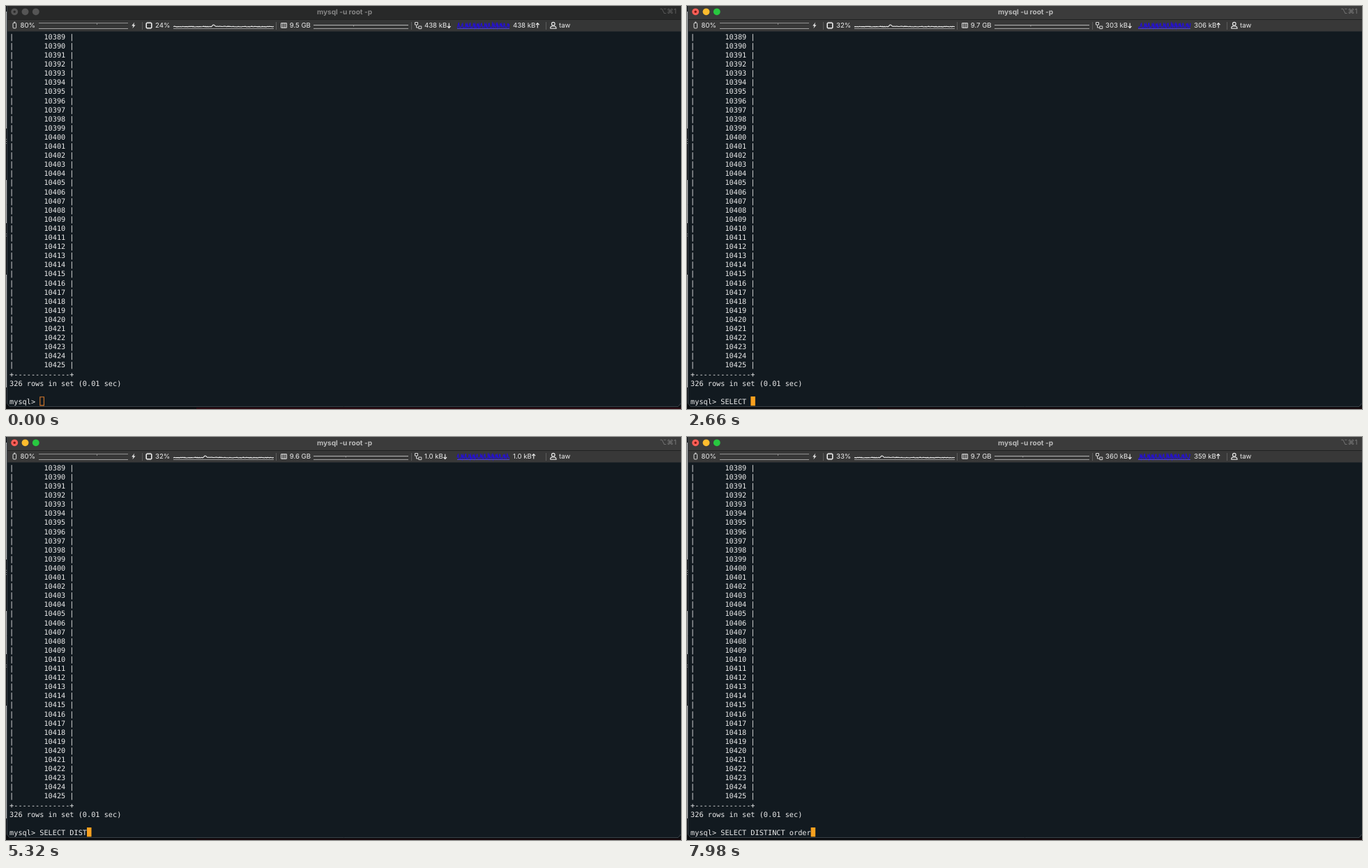
Animation of 968 by 579 pixels, one loop 8 s. Source, as an HTML page with a canvas:

```html
<!DOCTYPE html>
<html lang="en">
<head>
<meta charset="utf-8">
<title>Terminal session</title>
<style>
html, body { margin: 0; width: 100%; height: 100%; overflow: hidden; background: #0b0d10; }
canvas { display: block; }
</style>
</head>
<body>
<canvas id="stage" width="968" height="579"></canvas>
<script>
const ctx = document.getElementById('stage').getContext('2d');
ctx.textRendering = 'geometricPrecision';

const LOOP = 8000, FOCUS_AT = 490, SAMPLE_MS = 650;
const CELL = 6.162, ROW = 13.1, LEFT = 5.1, BASE = 47.8;
const MONO = '10.24px "DejaVu Sans Mono", monospace';
const UI = '9.6px Inter, sans-serif';
const WHITE = '#ececec';

// Each edit: time, characters to erase, text to add.
const EDITS = [
  [1050, 0, 'S'], [1190, 0, 'E'], [1330, 0, 'L'], [1470, 0, 'E'], [1610, 0, 'C'],
  [1890, 0, 'T'], [2240, 0, ' '], [2870, 0, 'D'], [3150, 0, 'I'], [3430, 0, 'S'],
  [3780, 1, ''], [3920, 1, ''], [4060, 1, ''], [4340, 0, 'D'], [4620, 0, 'S'],
  [4830, 1, ''], [4900, 0, 'I'], [5040, 0, 'S'], [5250, 0, 'T'], [5390, 0, 'I'],
  [5530, 0, 'N'], [5670, 0, 'C'], [5810, 0, 'T'], [5950, 0, ' '], [6930, 0, 'o'],
  [7420, 0, 'r'], [7630, 0, 'd'], [7770, 0, 'e'], [7910, 0, 'r']
];
const CPU = [24, 26, 28, 30, 32, 30, 31, 31, 32, 34, 33, 33, 33];
const RAM = ['9.5', '9.6', '9.6', '9.6', '9.7', '9.7', '9.7', '9.6', '9.6', '9.6', '9.7', '9.7', '9.7'];
const NET = [
  [0, '438', '438'], [650, '1.0', '1.0'], [1950, '303', '306'], [3250, '307', '333'],
  [3900, '298', '297'], [4900, '1.0', '1.0'], [6500, '86', '88'], [7150, '360', '359']
];

const noise = n => {
  const s = Math.sin(n * 127.1 + 31.7) * 43758.5453;
  return s - Math.floor(s);
};

function rect(x, y, w, h, color) {
  ctx.fillStyle = color;
  ctx.fillRect(x, y, w, h);
}

function path(points, color, width = 1) {
  ctx.strokeStyle = color;
  ctx.lineWidth = width;
  ctx.beginPath();
  points.forEach(([x, y]) => ctx.lineTo(x, y));
  ctx.stroke();
}

function box(x, y, w, h, color, width = 1, radius = 0) {
  ctx.strokeStyle = color;
  ctx.lineWidth = width;
  ctx.beginPath();
  ctx.roundRect(x, y, w, h, radius);
  ctx.stroke();
}

function disc(x, y, r, color) {
  ctx.fillStyle = color;
  ctx.beginPath();
  ctx.arc(x, y, r, 0, Math.PI * 2);
  ctx.fill();
}

function label(str, x, y, font = UI, color = WHITE, align = 'left') {
  ctx.font = font;
  ctx.fillStyle = color;
  ctx.textAlign = align;
  ctx.fillText(str, x, y);
}

function row(str, n) {
  ctx.font = MONO;
  ctx.fillStyle = WHITE;
  ctx.textAlign = 'left';
  [...str].forEach((ch, i) => {
    if (ch !== ' ') ctx.fillText(ch, LEFT + i * CELL, BASE + n * ROW);
  });
}

function typed(t) {
  let s = '';
  for (const [at, erase, add] of EDITS) {
    if (at > t) break;
    s = s.slice(0, s.length - erase) + add;
  }
  return s;
}

function backdrop(focused) {
  rect(0, 0, 968, 579, '#0b0d10');
  for (const [y, end] of [[8, 176], [250, 312], [386, 548]]) rect(0, y, 1, end - y, '#b4b4b4');
  for (const y of [191, 194, 197, 327, 330]) rect(0, y, 1, 1, '#858585');
  rect(273, 577, 695, 2, focused ? '#17090d' : '#2b0a11');
  ctx.fillStyle = '#121a20';
  ctx.beginPath();
  ctx.roundRect(2, 0, 966, 575.5, [0, 0, 5, 5]);
  ctx.fill();
  path([[1.5, 0], [1.5, 571], [5, 575.5], [964, 575.5], [967.5, 571]], '#394046');
}

function titleBar(focused) {
  rect(2, 0, 966, 19, focused ? '#3b3b3b' : '#282929');
  rect(2, 19, 966, 1, '#202122');
  const lights = focused ? ['#ff5f57', '#febc2e', '#28c840'] : ['#555', '#555', '#555'];
  lights.forEach((c, i) => disc(12.2 + i * 15.3, 8.3, 4.9, c));
  disc(12.2, 8.3, 1.7, focused ? '#7d1510' : '#2b2b2b');
  label('mysql -u root -p', 485.5, 11.5, 'bold 10.1px Inter, sans-serif',
    focused ? '#bababa' : '#848484', 'center');
  label('⌥⌘1', 961.5, 11, '10px Inter, "DejaVu Sans", sans-serif',
    focused ? '#7c7c7c' : '#606060', 'right');
}

function icons() {
  box(10, 24.3, 4.6, 7.6, '#dedede', 1, 1);
  rect(11.3, 22.6, 2, 1.2, '#dedede');
  ctx.fillStyle = WHITE;
  ctx.beginPath();
  for (const [x, y] of [[184.2, 23.5], [180.2, 28.4], [182.6, 28.4], [181.4, 32.3], [185.5, 27.2], [183.1, 27.2]]) ctx.lineTo(x, y);
  ctx.fill();
  box(201.2, 24.2, 7.6, 7.6, WHITE, 1.6, 1.2);
  for (const d of [203, 205, 207]) {
    rect(d - .4, 22.6, .8, 1, '#bbb');
    rect(d - .4, 32.4, .8, 1, '#bbb');
  }
  box(394.5, 24.6, 8, 6.6, '#dedede', 1);
  for (const x of [397, 400]) path([[x, 24], [x, 32]], '#dedede', 1.1);
  box(586.5, 23.5, 4, 3.6, '#d8d8d8');
  box(591.8, 29, 4, 3.6, '#d8d8d8');
  path([[588.5, 27.5], [588.5, 31], [591.5, 31]], '#d8d8d8');
  ctx.strokeStyle = WHITE;
  ctx.lineWidth = 1.1;
  ctx.beginPath();
  ctx.arc(784.8, 25.7, 2.3, 0, Math.PI * 2);
  ctx.stroke();
  path([[780.5, 32.3], [781, 30.2], [782.8, 29], [786.8, 29], [788.6, 30.2], [789.1, 32.3], [780.5, 32.3]], WHITE, 1.1);
}

function charts(k) {
  path([[47, 24.5], [175, 24.5]], '#8f8f8f');
  path([[47, 32.5], [175, 32.5]], '#a2a2a2');
  rect(130, 25, 1, 2, '#888');

  path([[240, 32.5], [384, 32.5]], '#969696');
  const cpu = [];
  for (let i = 0; i <= 96; i++) {
    const d = i + k - 38.3;
    const spike = Math.max(0, 1 - Math.abs(d) / 1.8) * 2.8 + (d > 0 && d < 12 ? .5 : 0);
    cpu.push([240 + i * 1.5, 30 - noise(i + k) * .9 - spike]);
  }
  path(cpu, '#eee', 1.1);

  path([[441, 27.5], [577, 27.5]], '#b8b8b8');
  path([[441, 32.5], [577, 32.5]], '#a2a2a2');
  rect(498 - k * 1.4, 28, 1, 1.5, '#888');

  const net = [];
  for (let i = 0; i <= 96; i++) {
    const n = i + k, phase = n % 7;
    const high = phase === 2 || phase === 3 || (phase === 5 && noise(n) > .6);
    net.push([647 + i * .78, high ? 24 + noise(n) * 3 : 31.5 - noise(n + 9) * 2]);
  }
  path(net, '#2410d2', 1.2);
  path([[647, 32.5], [722, 32.5]], '#5145c9');
}

function rate(value, x, dir) {
  const str = value + ' kB';
  label(str, x, 31.4);
  const cx = x + ctx.measureText(str).width + 3, tip = 28 + dir * 3.4;
  path([[cx, 28 - dir * 3.4], [cx, tip]], WHITE, 1.1);
  path([[cx - 2.3, tip - dir * 2.4], [cx, tip], [cx + 2.3, tip - dir * 2.4]], WHITE, 1.1);
}

function statusBar(t, focused) {
  rect(2, 20, 966, 16.5, focused ? '#383838' : '#353636');
  rect(2, 36, 966, 1, '#252a2e');
  for (const x of [195, 387, 581, 774]) rect(x, 23, 1, 11, '#5c5c5c');
  const k = Math.floor(t / SAMPLE_MS);
  icons();
  charts(k);
  label('80%', 20.5, 31.4);
  label(CPU[k] + '%', 214, 31.4);
  label(RAM[k] + ' GB', 406.7, 31.4);
  const net = NET.filter(n => n[0] <= t).pop();
  rate(net[1], 600, 1);
  rate(net[2], 727, -1);
  label('taw', 793, 31.4);
}

function terminal(t, focused) {
  for (let i = 0; i < 37; i++) row('|       ' + (10389 + i) + ' |', i);
  row('+-------------+', 37);
  row('326 rows in set (0.01 sec)', 38);
  const line = 'mysql> ' + typed(t);
  row(line, 40);
  const x = LEFT + line.length * CELL;
  if (focused) rect(x, 561, 6.5, 13.3, '#f9a11f');
  else box(x + .6, 561.7, 5.6, 12.2, '#d5792c', 1.1);
}

function draw(t) {
  const focused = t >= FOCUS_AT;
  backdrop(focused);
  titleBar(focused);
  statusBar(t, focused);
  terminal(t, focused);
}

const start = performance.now();
function tick() {
  draw((performance.now() - start) % LOOP);
  requestAnimationFrame(tick);
}
tick();
</script>
</body>
</html>
```
